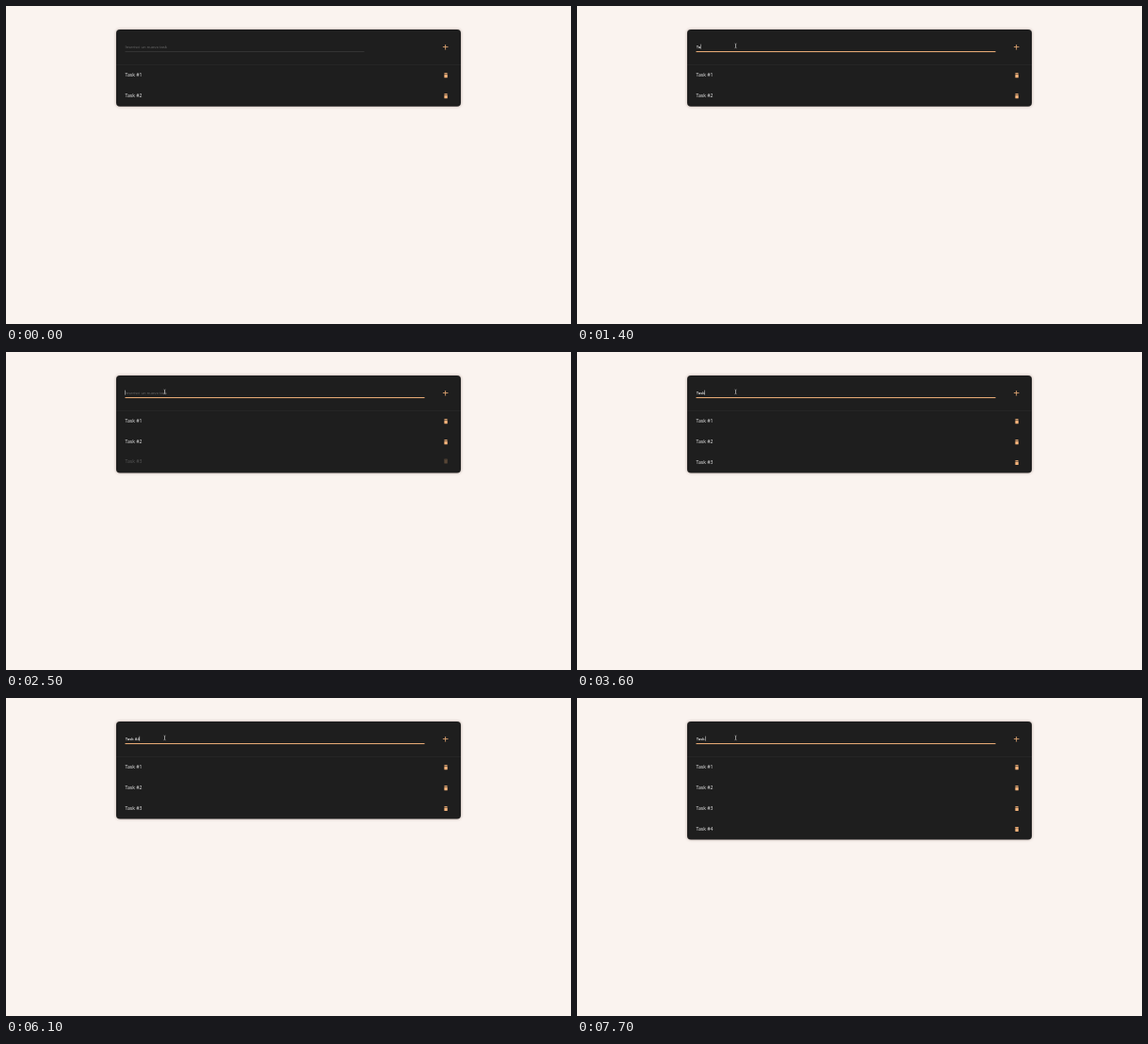
An HTML page for the animation above (8000 ms loop, 600 by 338 pixels).

```html
<!DOCTYPE html>
<html lang="it">
<head>
<meta charset="utf-8">
<title>Task list</title>
<style>
  html, body { margin: 0; width: 100%; height: 100%; overflow: hidden; background: #faf3ef; }
  svg { display: block; width: 600px; height: 338px; }
  text { font-family: "Open Sans", "Noto Sans", sans-serif; white-space: pre; }

  .card { fill: #1e1e1e; filter: drop-shadow(0 0 1.6px rgba(60, 30, 20, .4)); animation: grow 8s step-end infinite; }
  .rule { fill: #2a2a2a; }
  .row text { font-size: 5.1px; font-weight: 500; fill: #f0f0f0; }
  .icon { fill: #f3b27a; }
  .typed { font-size: 4.2px; font-weight: 600; fill: #f2f2f2; }
  .hint { font-size: 4.2px; fill: #6c6c6c; }
  .caret { fill: #e8e8e8; }
  .line { animation: widen 8s infinite, thicken 8s step-end infinite; }
  .pointer { fill: none; stroke: #c4c4c4; stroke-width: .5; animation: arrive 8s step-end infinite; }
  .third { animation: enter3 8s infinite; }
  .fourth { animation: enter4 8s infinite; }

  @keyframes grow {
    0% { height: 81.7px; }
    29.75% { height: 103.6px; }
    82.25%, 100% { height: 125.5px; }
  }
  @keyframes widen {
    0%, 7.9% { width: 254px; fill: #484848; animation-timing-function: ease; }
    14.2%, 100% { width: 318px; fill: #fbb97f; }
  }
  @keyframes thicken {
    0% { height: .5px; }
    8.5% { height: .6px; }
    13.6%, 100% { height: .95px; }
  }
  @keyframes arrive {
    0% { visibility: hidden; }
    8.5%, 100% { visibility: visible; }
  }
  @keyframes enter3 {
    0%, 29.1% { opacity: 0; transform: translateY(-2.2px); animation-timing-function: ease; }
    40.4%, 100% { opacity: 1; transform: none; }
  }
  @keyframes enter4 {
    0%, 81.5% { opacity: 0; transform: translateY(-2.2px); animation-timing-function: ease; }
    92.8%, 100% { opacity: 1; transform: none; }
  }
</style>
</head>
<body>
<svg viewBox="0 0 600 338">
  <defs>
    <path id="bin" d="M465.1 71.5h1.1l.4-.4h1l.4.4h1.1v.6h-4zM465.4 72.5h3.4v3.2q0 .5-.5.5h-2.4q-.5 0-.5-.5z"/>
  </defs>
  <rect class="card" x="117" y="25" width="366" rx="4"/>
  <rect class="rule" x="117" y="62.3" width="366" height=".6"/>
  <rect class="line" x="126.5" y="48.1"/>
  <text class="hint" x="126.5" y="44.7">Inserisci un nuovo task</text>
  <text class="typed" x="126.7" y="44.6"></text>
  <rect class="caret" y="40.6" width=".5" height="5"/>
  <path class="pointer" d="M167.5 39.9q1 0 1 .7v3.4q0 .7-1 .7M169.5 39.9q-1 0-1 .7v3.4q0 .7 1 .7"/>
  <path class="icon" d="M466.3 40.9h.8v2.4h2.4v.8h-2.4v2.4h-.8v-2.4h-2.4v-.8h2.4z"/>
  <g class="row"><text x="126.6" y="75.4">Task #1</text><use class="icon" href="#bin"/></g>
  <g class="row" transform="translate(0 21.95)"><text x="126.6" y="75.4">Task #2</text><use class="icon" href="#bin"/></g>
  <g transform="translate(0 43.9)"><g class="row third"><text x="126.6" y="75.4">Task #3</text><use class="icon" href="#bin"/></g></g>
  <g transform="translate(0 65.85)"><g class="row fourth"><text x="126.6" y="75.4">Task #4</text><use class="icon" href="#bin"/></g></g>
</svg>
<script>
  const LOOP = 8000, FOCUS = 700;
  const hint = document.querySelector('.hint');
  const typed = document.querySelector('.typed');
  const caret = document.querySelector('.caret');

  // Input value from each moment on; the caret blink restarts with every edit.
  const edits = [
    [0, ''], [FOCUS, ''],
    [1300, 'T'], [1400, 'Ta'], [1500, 'Tas'], [1600, 'Task'], [1700, 'Task '],
    [2200, 'Task #'], [2300, 'Task #3'], [2400, ''],
    [3200, 'T'], [3300, 'Ta'], [3400, 'Tas'], [3600, 'Task'], [4200, 'Task '],
    [4800, 'Task #'], [4900, 'Task #3'], [5000, 'Task #3 '], [5200, 'Task #3'], [5300, 'Task #'],
    [5700, 'Task '], [5800, 'Task'], [5900, 'Task '], [6000, 'Task #'], [6100, 'Task #4'], [6600, ''],
    [7300, 'T'], [7400, 'Ta'], [7500, 'Tas'], [7600, 'Task'], [7700, 'Task ']
  ];
  const blinks = [[2900, 3200], [4000, 4200], [7100, 7300]];

  let start;
  function draw(now) {
    start ??= now;
    const t = (now - start + 20) % LOOP;
    const value = edits.findLast(([at]) => at <= t)[1];
    const hidden = t < FOCUS || blinks.some(([from, to]) => t >= from && t < to);
    if (typed.textContent !== value) typed.textContent = value;
    hint.style.visibility = value ? 'hidden' : 'visible';
    caret.style.visibility = hidden ? 'hidden' : 'visible';
    caret.setAttribute('x', 126.5 + (value ? typed.getComputedTextLength() : 0));
    requestAnimationFrame(draw);
  }
  requestAnimationFrame(draw);
</script>
</body>
</html>
```
